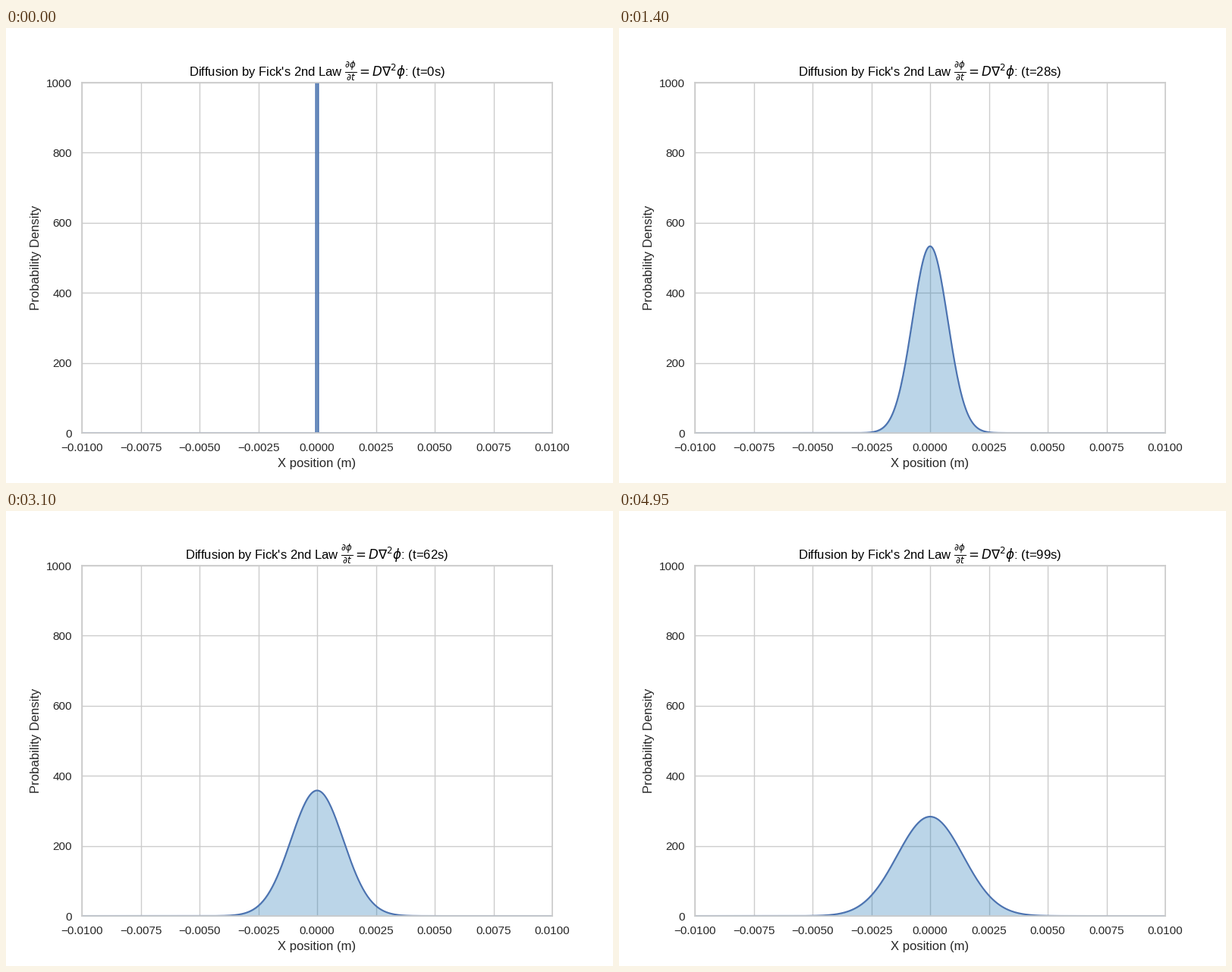
Recreate the animation shown at these times as a matplotlib script. Size 800 px wide and 600 px high, loop 5000 ms.

```python
import numpy as np
import matplotlib.pyplot as plt
from matplotlib.animation import FuncAnimation

D = 1e-8            # diffusion coefficient, m^2/s
HALF_WIDTH = 0.01   # m
FRAMES = 100
LINE_COLOR = "#4C72B0"
FILL_COLOR = "#1f77b4"

plt.rcParams.update({
    "font.family": "Liberation Sans",
    "axes.edgecolor": "0.8",
    "axes.linewidth": 1.25,
    "axes.axisbelow": True,
    "axes.grid": True,
    "axes.labelcolor": "0.15",
    "axes.labelsize": 12,
    "axes.titlesize": 12,
    "grid.color": "0.8",
    "grid.linewidth": 1,
    "lines.linewidth": 1.5,
    "lines.solid_capstyle": "round",
})
for axis, side in (("xtick", "bottom"), ("ytick", "left")):
    plt.rcParams.update({
        f"{axis}.{side}": False,
        f"{axis}.color": "0.15",
        f"{axis}.labelsize": 11,
        f"{axis}.major.size": 6,
    })

x, dx = np.linspace(-HALF_WIDTH, HALF_WIDTH, 401, retstep=True)


def density(t):
    """Point source at t = 0, spreading as a Gaussian afterwards."""
    if t == 0:
        return np.where(np.abs(x) < dx / 2, 1 / dx, 0.0)
    return np.exp(-x**2 / (4 * D * t)) / np.sqrt(4 * np.pi * D * t)


fig, ax = plt.subplots(figsize=(8, 6), dpi=100)
ax.set_xlim(-HALF_WIDTH, HALF_WIDTH)
ax.set_ylim(0, 1000)
ax.set_xlabel("X position (m)")
ax.set_ylabel("Probability Density")

line, = ax.plot(x, density(0), color=LINE_COLOR)
fill = ax.fill_between(x, density(0), color=FILL_COLOR, alpha=0.3)
title = ax.set_title("", color="black")


def update(t):
    global fill
    phi = density(t)
    line.set_ydata(phi)
    fill.remove()
    fill = ax.fill_between(x, phi, color=FILL_COLOR, alpha=0.3)
    title.set_text(
        "Diffusion by Fick's 2nd Law "
        r"$\frac{\partial \phi}{\partial t} = D \nabla^2 \phi$: "
        f"(t={t}s)"
    )
    return line, fill, title


anim = FuncAnimation(fig, update, frames=FRAMES, interval=50,
                     repeat=True, repeat_delay=0, blit=False)
plt.show()
```
